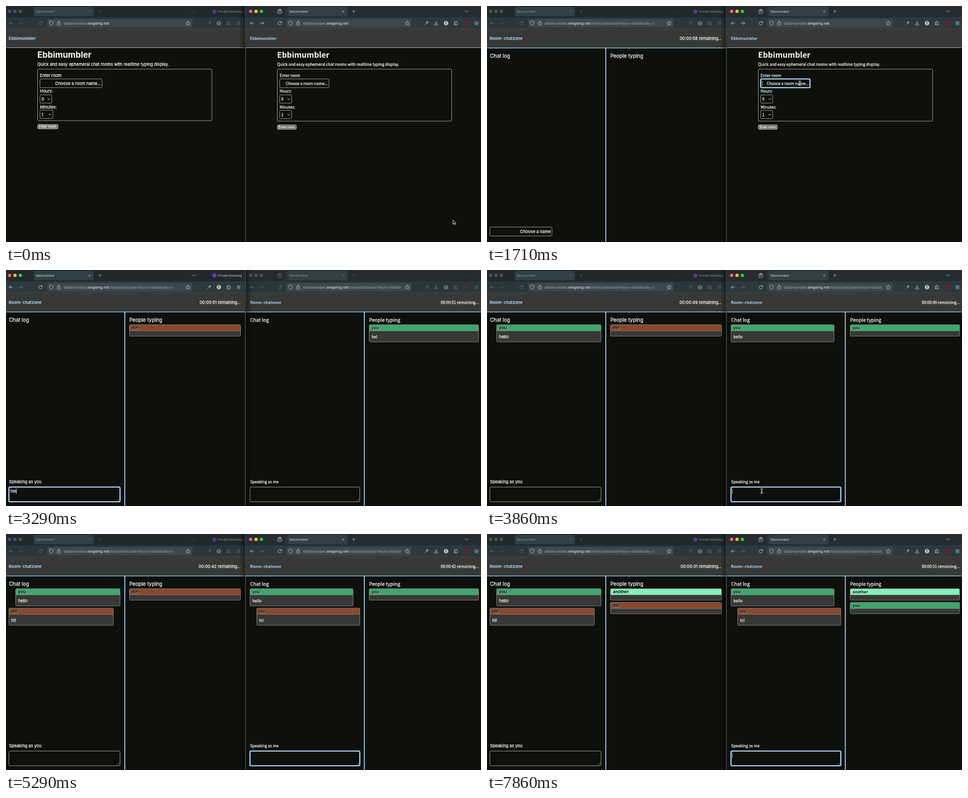
Animation, 1060 px wide and 529 px high, one loop 8 s. Source, as an HTML page with a canvas:

```html
<!DOCTYPE html>
<html lang="en">
<head>
<meta charset="utf-8">
<title>Ebbimumbler</title>
<style>
html, body { margin: 0; width: 100%; height: 100%; overflow: hidden; background: #0e100c; }
canvas { display: block; width: 1060px; height: 529px; }
</style>
</head>
<body>
<canvas id="stage" width="1060" height="529"></canvas>
<script>
const ctx = document.getElementById('stage').getContext('2d');
const HUMAN = '"Noto Sans CJK JP", "Noto Sans CJK SC", "Noto Sans CJK", "Noto Sans", sans-serif';
const UI = 'Inter, sans-serif';
const LOOP = 8000, FPS = 7, SPEED = 4.466;
const APP = 'Ebbimumbler', ROOM = 'chatzone';
const PAGE = '#0e100c', PANEL = '#383836', INK = '#f6faf5', BLUE = '#a5d5f8', EDGE = '#a8aba6';
const GREEN = '#3fa66e', BROWN = '#88492f', MINT = '#82f2b8';

const LEFT = {
  x: 0, w: 534, form: 0, font: UI, size: 9.3, h1: 18.6, h2: 11.3, small: 7.6, lift: 0,
  inputW: 138.5, minuteW: 29, buttonW: 46, extra: 0, title: 6, time: 524,
  chat: 6.5, logEnd: 254.5, split: 265, typing: 275.5, typingEnd: 523.5,
  lights: 8, tab: 62, nav: [11, 33, 77], field: [92, 416], chevron: 419,
  bar: '#21292c', tabFill: '#2e4045'
};
const RIGHT = {
  x: 535, w: 525, form: 535, font: HUMAN, size: 8.75, h1: 17.3, h2: 10.85, small: 7, lift: .5,
  inputW: 110, minuteW: 26.5, buttonW: 43, extra: 1, title: 544.5, time: 1055,
  chat: 544.5, logEnd: 789.5, split: 799.5, typing: 810.5, typingEnd: 1054.5,
  lights: 546, tab: 628, nav: [549, 571, 611], field: [626, 905], chevron: 1028,
  bar: '#252c31', tabFill: '#333e45'
};

function rect(x, y, w, h, fill, stroke, r = 0, line = 1) {
  ctx.beginPath();
  ctx.roundRect(x, y, w, h, r);
  if (fill) { ctx.fillStyle = fill; ctx.fill(); }
  if (stroke) { ctx.strokeStyle = stroke; ctx.lineWidth = line; ctx.stroke(); }
}
function dot(x, y, r, fill) {
  ctx.beginPath();
  ctx.arc(x, y, r, 0, 7);
  ctx.fillStyle = fill;
  ctx.fill();
}
function path(d, x, y, color, line = 1, fill) {
  const p = new Path2D(d);
  ctx.save();
  ctx.translate(x, y);
  ctx.lineCap = ctx.lineJoin = 'round';
  if (fill) { ctx.fillStyle = fill; ctx.fill(p); }
  ctx.strokeStyle = color;
  ctx.lineWidth = line;
  ctx.stroke(p);
  ctx.restore();
}
function text(s, x, y, size, family, color = INK, weight = 400, align = 'left', bloom = 0) {
  ctx.font = `${weight} ${size}px ${family}`;
  ctx.textAlign = align;
  ctx.fillStyle = ctx.strokeStyle = color;
  ctx.fillText(s, x, y);
  if (bloom) {
    ctx.lineJoin = 'round';
    ctx.lineWidth = bloom;
    ctx.strokeText(s, x, y);
  }
  return ctx.measureText(s).width;
}
// Page text is slightly thickened, as light text on a dark page is smoothed.
const label = (win, s, x, y, size = win.size, align = 'left') =>
  text(s, x, y, size, win.font, INK, 400, align, .28);

const ICON = {
  back: 'M4 0H-4M-.5 -3.5L-4 0L-.5 3.5',
  forward: 'M-4 0H4M.5 -3.5L4 0L.5 3.5',
  reload: 'M3.5 -1.5A3.8 3.8 0 1 0 3.8 1M3.8 -4V-1.3H1',
  shield: 'M0 -4.5L4 -3V0Q3.5 3 0 4.7Q-3.5 3 -4 0V-3Z',
  lock: 'M-3.2 -.7H3.2V4.2H-3.2ZM-2 -.7V-2.7A2 2 0 0 1 2 -2.7V-.7',
  star: 'M0 -4.6L1.4 -1.5L4.7 -1.2L2.2 1L3 4.3L0 2.5L-3 4.3L-2.2 1L-4.7 -1.2L-1.4 -1.5Z',
  wrench: 'M-3.5 3.5L1 -1M0 -1.3A2.4 2.4 0 0 1 3 -3.7L1.6 -2.2L2.2 -1.6L3.7 -3A2.4 2.4 0 0 1 .8 .4',
  puzzle: 'M-3.5 -2H-1.2V-3.2A1.2 1.2 0 0 1 1.2 -3.2V-2H3.5V4H-3.5V2H-2A1.1 1.1 0 0 0 -2 -.2H-3.5Z',
  menu: 'M-3.5 -2.7H3.5M-3.5 0H3.5M-3.5 2.7H3.5',
  download: 'M0 -4V1.5M-2.5 -.8L0 1.7L2.5 -.8M-4 2.2V4H4V2.2',
  box: 'M-4.3 -1.5H4.3V4.3H-4.3ZM-3.5 -3H3.5M-2.5 -4.6H2.5M-1.5 1H1.5',
  close: 'M-2 -2L2 2M2 -2L-2 2',
  plus: 'M-3.5 0H3.5M0 -3.5V3.5',
  down: 'M-3.5 -1.7L0 1.7L3.5 -1.7',
  arrow: 'M0 0V9L2.1 7.1L3.6 10.3L5 9.6L3.5 6.6H6.3Z',
  beam: 'M-2.5 -5Q0 -5 0 -3.5Q0 -5 2.5 -5M0 -3.5V3.5M-2.5 5Q0 5 0 3.5Q0 5 2.5 5M-1.3 1H1.3'
};

function chrome(win, active, inRoom) {
  const bright = active ? '#c0c7c9' : '#647175', faint = active ? '#66737a' : '#4a565a';
  rect(win.x, 0, win.w, 26, win.bar);
  rect(win.x, 25.5, win.w, 25.5, active ? '#2c3a40' : '#2a363b');
  rect(win.x, 50.5, win.w, .7, '#465054');

  const lights = active ? ['#fb5f57', '#fcbb2f', '#2ac840'] : Array(3).fill('#4a5457');
  lights.forEach((c, k) => dot(win.lights + 12 * k, 12, 3.8, c));
  rect(win.tab, 2, 134, 21, win.tabFill, null, 3);
  text(APP, win.tab + 4.5, 15, 6.8, UI, active ? '#dbe0e1' : '#8b9799');
  path(ICON.close, win.tab + 124.5, 12, bright, .9);
  path(ICON.plus, win.tab + 148, 12, active ? '#a3acaf' : faint, .9);
  path(ICON.down, win.chevron, 12, active ? bright : faint, .9);

  const [back, forward, reload] = win.nav;
  path(ICON.back, back, 38.5, bright);
  path(ICON.forward, forward, 38.5, win === RIGHT && !inRoom ? bright : faint);
  path(ICON.reload, reload, 38.5, bright);

  const [a, b] = win.field;
  rect(a, 29, b - a, 19, '#3b494e', null, 3);
  path(ICON.shield, a + 9, 38.5, '#c0c7c9', .9);
  path(ICON.lock, a + 26, 38.5, '#c0c7c9', .9);
  path(ICON.star, b - 9.5, 38.5, '#c0c7c9', .9);
  ctx.save();
  ctx.beginPath();
  ctx.rect(a, 28, b - a - 23, 20);
  ctx.clip();
  const gray = '#9ca6a9';
  let x = a + 37;
  x += text(APP.toLowerCase() + '.', x, 41.8, 8.2, UI, gray);
  x += text('emgemg.net', x, 41.8, 8.2, UI, '#f0f4f4');
  if (inRoom) text(`/room/${ROOM}?hours=0&minutes=1`, x, 41.8, 8.2, UI, gray);
  ctx.restore();

  const tools = win === LEFT
    ? { wrench: 453, account: 475, puzzle: 497, menu: 519 }
    : { wrench: 938, download: 960, account: 982, puzzle: 1004, badge: 1027, menu: 1050 };
  for (const [name, tx] of Object.entries(tools)) {
    if (name === 'account') {
      dot(tx, 38.5, 5, active ? '#c4c8c9' : '#6a7679');
      text('E', tx, 41.2, 7, UI, '#2b393e', 600, 'center');
    } else if (name === 'badge') {
      dot(tx, 38.5, 4.2, active ? '#8b1620' : '#5a2a31');
    } else path(ICON[name], tx, 38.5, bright);
  }
  if (win === LEFT) {
    dot(465, 12.3, 4.6, active ? '#7530bd' : '#63319a');
    text('Private browsing', 473.5, 14.8, 6.7, UI, active ? '#d4dadb' : '#869194');
  } else {
    path(ICON.box, 611, 12, bright, .9);
    rect(624.5, 2, .8, 21, '#3b474b');
  }
}

// Text field with a placeholder at its right edge.
function field(win, x, y, w, h, value, hint, focus, caret) {
  rect(x, y, w, h, PAGE, focus ? BLUE : EDGE, 2.5, focus ? 2.6 : 1);
  const tall = h > 25, base = tall ? y + 12.5 : y + h / 2 + 3.6;
  const used = label(win, value, x + 3.5, base);
  if (!value && hint) label(win, hint, x + w - 2.7, base, win.size, 'right');
  if (focus && caret) rect(x + 3 + used, tall ? y + 3.5 : y + 4, .8, 12, INK);
  if (tall) path('M0 0L-6 6M0 3.5L-2.5 6', x + w - 1.5, y + h - 7.5, '#858984', .8);
}
function select(win, x, y, w, value) {
  rect(x, y, w, 18.5, PAGE, EDGE, 2);
  label(win, value, x + 3.5, y + 13);
  path('M-2.3 -1.2L0 1.2L2.3 -1.2', x + w - 6.5, y + 9.7, INK, 1);
}

function form(win, s) {
  const x = win.form, { font, extra } = win;
  text(APP, win.title, 76, win.size, font, BLUE, 700);
  rect(win.x, 93, win.w, 1, '#c9cbc8');
  text(APP, x + 70, 116, win.h1, font, INK, 700);
  label(win, 'Quick and easy ephemeral chat rooms with realtime typing display.', x + 70, 133.6);
  rect(x + 70.5, 141.5, 389, 115.5 + extra, null, EDGE, 2);
  label(win, 'Enter room', x + 75.8, 159);
  field(win, x + 75.8, 163.5, win.inputW, 19.5, s.value, 'Choose a room name...', s.focus, true);
  label(win, 'Hours:', x + 75.8, 194.3);
  select(win, x + 75.8, 199.2, 26.5, '0');
  label(win, 'Minutes:', x + 75.8, 229.5);
  select(win, x + 75.8, 233.5 + win.lift, win.minuteW, '1');
  rect(x + 70.5, 265.5 + extra, win.buttonW - .5, 10, '#6b6c69', '#c2c4c0', 2.5);
  label(win, 'Enter room', x + 70 + win.buttonW / 2, 273.2 + extra, win.small, 'center');
}

function card(win, x, end, y, name, color, message) {
  const h = message ? 38.5 : 25.5;
  rect(x, y, end - x, h, PANEL, null, 2);
  rect(x, y, end - x, 14, color, null, [2, 2, 0, 0]);
  rect(x, y + 13.5, end - x, .8, '#858884');
  rect(x, y, end - x, h, null, '#858884', 2);
  ctx.save();
  ctx.shadowColor = 'rgba(255,255,255,.6)';
  ctx.shadowBlur = 1;
  ctx.shadowOffsetX = ctx.shadowOffsetY = .8;
  text(name, x + 5.5, y + 10.5, win.size, win.font, '#0b0d0a', 700);
  ctx.restore();
  if (message) label(win, message, x + 5.5, y + 30.4);
  return y + h + 5;
}

function room(win, s) {
  const { font, size } = win;
  text('Room: ' + ROOM, win.title, 76, size, font, BLUE, 700);
  label(win, `00:00:${s.left} remaining...`, win.time, 76, size, 'right');
  rect(win.x, 93.2, win.w, 1.6, BLUE);
  rect(win.split - .9, 94, 2, 435, BLUE);
  label(win, 'Chat log', win.chat + .3, 115.7, win.h2);
  label(win, 'People typing', win.typing - .3, 115.7, win.h2);
  if (!s.me) {
    field(win, win.chat, 495.5, win.inputW, 20, s.value, 'Choose a name', s.focus, true);
    return;
  }
  let y = 122.7;
  for (const [name, color, message] of s.log) {
    const own = name === s.me;
    y = card(win, win.chat + (own ? 15 : 0), win.logEnd - (own ? 0 : 15), y, name, color, message);
  }
  y = 122.7;
  for (const [name, color, draft] of s.typing) y = card(win, win.typing, win.typingEnd, y, name, color, draft);
  label(win, 'Speaking as ' + s.me, win.chat + .2, 478.3);
  field(win, win.chat, 486.5, win.logEnd - win.chat, 33, s.value, '', s.focus, s.caret);
}

function browser(win, active, s) {
  ctx.save();
  ctx.beginPath();
  ctx.rect(win.x, 0, win.w, 529);
  ctx.clip();
  rect(win.x, 0, win.w, 529, PAGE);
  rect(win.x, 51, win.w, 42.5, PANEL);
  chrome(win, active, s.inRoom);
  (s.inRoom ? room : form)(win, s);
  ctx.restore();
}

// Pointer stops by time step: [from, to, x, y, shape]
const POINTER = [
  [0, 2, 997.5, 480, 'arrow'], [2, 3, 700, 390, 'arrow'], [3, 4, 300, 230, 'arrow'], [4, 5, 150, 173, 'beam'],
  [11, 12, 460, 210, 'arrow'], [12, 13, 698, 173, 'beam'],
  [15, 16, 640, 420, 'arrow'], [16, 17, 600, 505, 'beam'],
  [18, 19, 330, 503, 'arrow'], [19, 20, 107, 505.5, 'beam'],
  [22, 23, 107, 502, 'beam'], [26, 27, 380, 498, 'arrow'], [27, 28, 613, 495.5, 'beam']
];
function pointer(n) {
  const stop = POINTER.find(([from, to]) => n >= from && n < to);
  if (!stop) return;
  const [, , x, y, shape] = stop;
  if (shape === 'arrow') path(ICON.arrow, x, y, '#e6e8e6', 1, '#111');
  else {
    path(ICON.beam, x, y, '#333', 2);
    path(ICON.beam, x, y, '#f4f6f4', 1);
  }
}

function draw(t) {
  const n = Math.floor((t + 5) * FPS / 1000);
  const real = n / FPS * SPEED;
  const left = String(Math.min(59, Math.floor(66.4 - real))).padStart(2, '0');
  const blink = ((real / 1.134 + .1) % 1) < .5;
  const typed = (s, start, end, rate) => n >= start && n < end ? s.slice(0, Math.ceil((n - start + 1) * rate)) : '';
  const leftActive = (n >= 4 && n < 12) || (n >= 19 && n < 27);

  const hello = typed('hello', 23, 25, 3), hi = typed('hi!', 28, 31, 1);
  const log = [];
  if (n >= 25) log.push(['you', GREEN, 'hello']);
  if (n >= 31) log.push(['me', BROWN, 'hi!']);
  const guest = n >= 51 ? [['another', MINT, '']] : [];

  browser(LEFT, leftActive, {
    inRoom: n >= 10, me: n >= 21 && 'you', left, log, caret: true,
    typing: [...guest, ['me', BROWN, hi]],
    focus: (n >= 4 && n < 10) || n === 19 || n === 20 || (n >= 22 && n < 27),
    value: typed(ROOM, 5, 10, 2) + typed('you', 20, 21, 3) + hello
  });
  browser(RIGHT, !leftActive, {
    inRoom: n >= 15, me: n >= 18 && 'me', left, log, caret: blink || (n >= 27 && n < 32),
    typing: [...guest, ...(n >= 21 ? [['you', GREEN, hello]] : [])],
    focus: (n >= 12 && n < 15) || n === 16 || n === 17 || n >= 27,
    value: typed(ROOM, 13, 15, 4) + typed('me', 17, 18, 2) + hi
  });

  const side = leftActive ? 1 : -1;
  const shade = ctx.createLinearGradient(534.5, 0, 534.5 + side * 14, 0);
  shade.addColorStop(0, 'rgba(0,0,0,.45)');
  shade.addColorStop(1, 'rgba(0,0,0,0)');
  rect(leftActive ? 534.5 : 520.5, 0, 14, 529, shade);
  rect(533, 0, 2.5, 529, '#1c1f1e');
  rect(533.7, 0, 1, 529, '#5d605e');
  pointer(n);
}

function tick(now) {
  draw(now % LOOP);
  requestAnimationFrame(tick);
}
draw(0);
requestAnimationFrame(tick);
</script>
</body>
</html>
```
